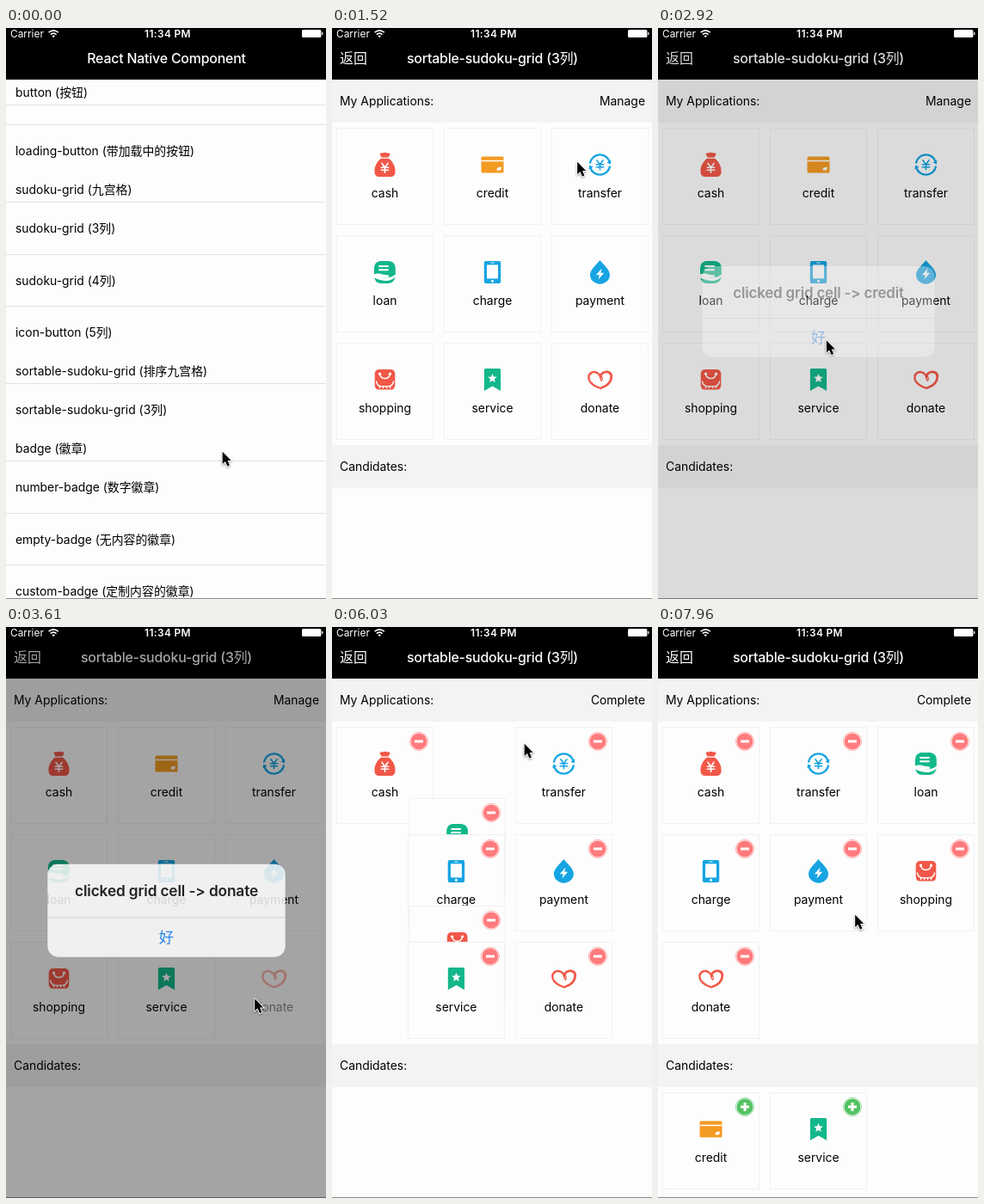
An HTML page that plays this animation: 372 by 664 pixels, repeating every 8000 ms.

```html
<!DOCTYPE html>
<html lang="zh-CN">
<head>
<meta charset="utf-8">
<title>Sortable grid</title>
<style>
  html, body { margin: 0; width: 100%; height: 100%; overflow: hidden; background: #fdfdfd; }
  svg { display: block; width: 100vw; height: 100vh; }
  text {
    font: 13.9px Inter, "Noto Sans CJK SC", "Noto Sans CJK", sans-serif;
    font-feature-settings: "calt" 0;
    white-space: pre;
  }
  .mid { text-anchor: middle; }
  .end { text-anchor: end; }
  .nav { fill: #fff; font-size: 15.9px; }
  .title { font-weight: 500; letter-spacing: -.2px; }
  .status { fill: #fff; font-size: 11.9px; }
  .clock { font-weight: 600; letter-spacing: .35px; }
  .ask { font-size: 16.9px; font-weight: 600; letter-spacing: -.15px; fill: #111; }
  .ok { font-size: 17px; font-weight: 500; fill: #1482f5; }
</style>
</head>
<body>
<svg id="stage" viewBox="0 0 372 664" preserveAspectRatio="none">
  <rect width="372" height="664" fill="#fdfdfd"/>
  <g id="list"></g>
  <g id="page">
    <rect y="60" width="372" height="604" fill="#fdfdfd"/>
    <path d="M0 60H372V110H0ZM0 485H372V535H0Z" fill="#f3f3f3"/>
    <text x="9" y="90">My Applications:</text>
    <text x="364" y="90" class="end" id="mode"></text>
    <text x="9" y="515">Candidates:</text>
    <g id="cells"></g>
  </g>
  <rect width="372" height="60"/>
  <text x="186.5" y="41" class="nav title mid" id="homeTitle">React Native Component</text>
  <text x="186.5" y="41" class="nav title mid" id="pageTitle">sortable-sudoku-grid (3列)</text>
  <text x="9" y="41" class="nav" id="back">返回</text>
  <path d="M0 663.5H372" stroke="#8c8c8c"/>
  <rect id="shade" width="372" height="664"/>
  <g id="alert">
    <rect x="-135" y="-52.7" width="270" height="105.4" rx="12" fill="#fff" fill-opacity=".95"/>
    <path d="M-135 8H135" stroke="#cfcfd2" stroke-width=".8"/>
    <text y="-16" class="ask mid" id="ask"></text>
    <text y="36.5" class="ok mid">好</text>
  </g>
  <text x="5" y="11" class="status">Carrier</text>
  <text x="188" y="11" class="status clock mid">11:34 PM</text>
  <g fill="none" stroke="#fff" stroke-width="1.6">
    <path d="M49.6 5.2Q55.2 .4 60.8 5.2M51.8 7.6Q55.2 4.6 58.6 7.6"/>
    <path d="M55.2 11.2L53.4 9.2Q55.2 7.8 57 9.2Z" fill="#fff" stroke="none"/>
    <rect x="344" y="2" width="22.4" height="9" rx="1.6" fill="#fff" stroke="none"/>
    <path d="M367.8 5V8" stroke-width="1.2"/>
  </g>
  <path id="cursor" d="M1.2 .8v14.2l3.3 -3l2.4 5.6l2.5 -1.1l-2.3 -5.5h4.1z"
        stroke="#fff" stroke-width="1.8" paint-order="stroke" stroke-linejoin="round"
        style="filter:drop-shadow(0 1px 1px #0006)"/>
</svg>
<script>
const LOOP = 8000;
const $ = id => document.getElementById(id);
const RED = '#f25848', ORANGE = '#f49b24', BLUE = '#16a4e2', GREEN = '#13b78b';

// List screen: [text centre, label, line below, is header]
const rows = [
  [82, 'image-button (图标按钮)', 112.5],
  [75, 'button (按钮)', 89.5, true],
  [143, 'loading-button (带加载中的按钮)'],
  [188, 'sudoku-grid (九宫格)', 202.5],
  [233, 'sudoku-grid (3列)', 263.5],
  [293.5, 'sudoku-grid (4列)', 323.5],
  [354, 'icon-button (5列)'],
  [399, 'sortable-sudoku-grid (排序九宫格)', 413.5],
  [444, 'sortable-sudoku-grid (3列)'],
  [489, 'badge (徽章)', 503.5],
  [534, 'number-badge (数字徽章)', 564.5],
  [594.5, 'empty-badge (无内容的徽章)', 624.5],
  [655, 'custom-badge (定制内容的徽章)']
];
$('list').innerHTML =
  '<rect id="press" y="414" width="372" height="60" fill="#dcdcdc"/>' +
  rows.map(([y, label, line, sticky]) =>
    (sticky ? '<rect y="60" width="372" height="29" fill="#fdfdfd"/>' : '') +
    `<text x="11" y="${y + 5}">${label}</text>` +
    (line ? `<path d="M0 ${line}H372" stroke="#e2e2e2"/>` : '')
  ).join('');

// Icons are drawn around their own centre
const shape = (d, fill) => `<path d="${d}" fill="${fill}"/>`;
const line = (d, color, width) =>
  `<path d="${d}" fill="none" stroke="${color}" stroke-width="${width}" stroke-linecap="round" stroke-linejoin="round"/>`;
const yen = (y, color) =>
  line(`M-3.6 ${y - 5}L0 ${y}L3.6 ${y - 5}M0 ${y}V${y + 6}M-4.2 ${y}H4.2M-4.2 ${y + 3}H4.2`, color, 1.6);
const star = Array.from({ length: 10 }, (_, i) => {
  const r = i % 2 ? 2.5 : 5.6, a = i * Math.PI / 5;
  return `${(r * Math.sin(a)).toFixed(2)} ${(-1.5 - r * Math.cos(a)).toFixed(2)}`;
}).join('L');

const icons = {
  cash: shape('M-6 -12.5Q-5 -14.5 -3 -13.5Q0 -14.8 3 -13.5Q6 -14.5 6 -12L4 -8.5H-4Z', RED) +
    shape('M-4.5 -7.3H4.5C9 -4 12.5 2 12 8C12 12 10 14 6 14H-6C-10 14 -12 12 -12 8C-12.5 2 -9 -4 -4.5 -7.3Z', RED) +
    yen(3.3, '#fff'),
  credit: `<rect x="-13" y="-9.5" width="26" height="19" rx="1.5" fill="${ORANGE}"/>` +
    shape('M-13 -5.2H13V-3.8H-13ZM5.5 3.5L10.5 2.5L9.5 6.5H5Z', '#fff'),
  transfer: line('M-11.4 -2.5A11.7 11.7 0 0 1 11.2 -3.4M11.4 2.5A11.7 11.7 0 0 1 -11.2 3.4', BLUE, 2.4) +
    shape('M13 -5.5L12.4 -.6L8 -2.6ZM-13 5.5L-12.4 .6L-8 2.6Z', BLUE) + yen(-.2, BLUE),
  loan: shape('M-6 -13H5Q12 -12 12.3 -5V5Q11 12 4 13H-5Q-12 12 -12.5 5V-5Q-12 -12 -6 -13Z', GREEN) +
    line('M-6.5 -7H3.5M-6.5 -2.8H3.5', '#fff', 2) +
    shape('M-13 2.5Q-7 .5 -3 2.5L4 3.5Q6 5 3 6H-2Q6 7.5 12.5 2.5L13 5Q7 10.5 0 10Q-7 9 -13 6.5Z', '#fff'),
  charge: `<rect x="-9.7" y="-13" width="19.4" height="26" rx="2" fill="${BLUE}"/>` +
    '<rect x="-6.5" y="-8.6" width="13" height="16" fill="#fff"/><circle cy="10.3" r="1.5" fill="#fff"/>' +
    line('M-1.8 -11H1.8', '#fff', .9),
  payment: shape('M0 -14C4 -9 11.5 -3 11.5 3A11.5 10.7 0 0 1 -11.5 3C-11.5 -3 -4 -9 0 -14Z', BLUE) +
    shape('M2.2 -4.5L-4.6 3.2H-.6L-2 8.5L4.8 .8H.8Z', '#fff'),
  shopping: `<rect x="-11.8" y="-12" width="23.6" height="23.6" rx="5" fill="${RED}"/>` +
    line('M-6 -6.5Q-5 -1.5 0 -1.5Q5 -1.5 6 -6.5', '#fff', 1.4) +
    '<circle cx="-6" cy="-6.8" r="1.6" fill="#fff"/><circle cx="6" cy="-6.8" r="1.6" fill="#fff"/>' +
    line('M-10 2Q-9 7 -5 7.6H5Q9 7 10 2M-6 7.6V9.5M-2 7.6V9.5M2 7.6V9.5M6 7.6V9.5', '#fff', 1.4),
  service: shape('M-9.6 -11.5Q-9.6 -13 -8 -13H8Q9.6 -13 9.6 -11.5V13L0 7.6L-9.6 13Z', GREEN) +
    shape(`M${star}Z`, '#fff'),
  donate: line('M2.5 9C9 7 13.3 2 13.3 -3.5C13.3 -8 9.5 -9.8 6 -9C3 -8.3 .8 -6 .5 -3', RED, 2.8) +
    line('M.3 -4.5C-2 -8.3 -6 -9.8 -9 -8.6C-14 -6.5 -14.3 -1 -11 3C-8 6.5 -3.5 8.8 1 9.8', RED, 2.4) +
    line('M.5 -3C.2 -1 1 .5 2 1.4C3.2 -.5 3 -2.5 1.8 -4', RED, 1.2)
};

const names = Object.keys(icons);
$('cells').innerHTML = names.map(name => `
  <g>
    <rect x=".5" y=".5" width="112" height="112" fill="#fdfdfd" stroke="#f1f1f1"/>
    <g transform="translate(56.5 43)">${icons[name]}</g>
    <text x="56.5" y="81" class="mid">${name}</text>
    <g class="badge">
      <circle r="10.6" fill="#fff" stroke-width=".8" stroke-opacity=".75"/>
      <circle r="9.5" stroke="none"/>
      <path d="M-5 0H5" stroke="#fff" stroke-width="3"/>
      <path d="M0 -5V5" stroke="#fff" stroke-width="3" class="plus"/>
    </g>
  </g>`).join('');
const cells = [...$('cells').children].map((el, i) => ({
  el, name: names[i],
  badge: el.querySelector('.badge'),
  rings: el.querySelectorAll('.badge circle'),
  plus: el.querySelector('.plus')
}));

// Timeline
const removals = [
  { name: 'credit', gone: 5905, from: 5922, to: 6202 },
  { name: 'service', gone: 6850, from: 6870, to: 7150 }
];
const alerts = [
  { name: 'credit', press: 2110, open: 2150, close: 2830 },
  { name: 'donate', press: 3400, open: 3458, close: 4130 }
];
const path = [
  [0, 250.5, 492], [360, 250.5, 492], [530, 193, 463], [1150, 193, 463], [1510, 284, 155],
  [1640, 284, 155], [1930, 200, 178.5], [2350, 200, 178.5], [2700, 194, 362], [2900, 194, 362],
  [3330, 288, 431.5], [3640, 288, 431.5], [3980, 196, 362], [4110, 196, 362], [4310, 333, 145],
  [4480, 342, 88], [4950, 342, 88], [5390, 217, 159], [5450, 217, 159], [5620, 222.5, 135],
  [6150, 222.5, 135], [6530, 97, 384], [7250, 97, 384], [7570, 184, 562], [7620, 184, 562],
  [7790, 242, 440], [7960, 228, 334], [8000, 228, 334]
];

const span = (t, a, b) => Math.min(1, Math.max(0, (t - a) / (b - a)));
const smooth = p => p * p * (3 - 2 * p);
const easeOut = p => 1 - (1 - p) ** 3;
const set = (el, attrs) => { for (const k in attrs) el.setAttribute(k, attrs[k]); };
const slot = i => [5 + 125 * (i % 3), 116 + 125 * Math.floor(i / 3)];

// Slot of every cell before and after each removal
const stages = [names];
for (const r of removals) stages.push(stages.at(-1).filter(n => n !== r.name));

function placeCell(cell, t) {
  const order = removals.findIndex(r => r.name === cell.name);
  const removal = removals[order];
  const moved = removal && t >= removal.gone;
  let [x, y] = slot(names.indexOf(cell.name)), grow = 1;
  if (moved) {
    [x, y] = [5 + 125 * order, 541];
    grow = easeOut(span(t, removal.to, removal.to + 220));
  } else {
    removals.forEach((r, k) => {
      const a = stages[k].indexOf(cell.name), b = stages[k + 1].indexOf(cell.name);
      if (b < 0) return;
      const p = smooth(span(t, r.from, r.to)), [ax, ay] = slot(a), [bx, by] = slot(b);
      x += (bx - ax) * p;
      y += (by - ay) * p;
    });
  }
  const c = 56.5 * (1 - grow);
  const pressed = alerts.find(a => a.name === cell.name);
  const fade = pressed ? span(t, pressed.press, pressed.press + 40) - span(t, pressed.open + 260, pressed.open + 400) : 0;
  set(cell.el, {
    transform: `translate(${x + c} ${y + c}) scale(${grow})`,
    opacity: 1 - .55 * fade,
    visibility: grow > 0 ? 'visible' : 'hidden'
  });
  const color = moved ? '#53c262' : '#ff7b7d';
  set(cell.badge, { transform: `translate(96 17) scale(${easeOut(span(t, 4680, 4950))})` });
  set(cell.rings[0], { stroke: color });
  set(cell.rings[1], { fill: color });
  set(cell.plus, { opacity: moved ? 1 : 0 });
}

function drawAlert(t) {
  const a = t < 3300 ? alerts[0] : alerts[1];
  const show = easeOut(span(t, a.open, a.open + 300));
  const hide = easeOut(span(t, a.close, a.close + 300));
  const p = show * (1 - hide);
  set($('shade'), { opacity: .4 * p });
  set($('alert'), { opacity: p, transform: `translate(186.5 329.7) scale(${1.2 - .2 * show})` });
  $('ask').textContent = `clicked grid cell -> ${a.name}`;
}

function drawCursor(t) {
  const i = Math.max(1, path.findIndex(k => k[0] > t));
  const [t0, x0, y0] = path[i - 1], [t1, x1, y1] = path[i];
  const p = smooth(span(t, t0, t1));
  set($('cursor'), { transform: `translate(${x0 + (x1 - x0) * p} ${y0 + (y1 - y0) * p})` });
}

function draw(t) {
  const push = easeOut(span(t, 910, 1420));
  set($('press'), { opacity: t >= 830 && t < 1000 ? 1 : 0 });
  set($('list'), { transform: `translate(${-112 * push} 0)`, opacity: push < 1 ? 1 - .7 * push : 0 });
  set($('page'), { transform: `translate(${372 * (1 - push)} 0)` });
  set($('homeTitle'), { transform: `translate(${-90 * push} 0)`, opacity: 1 - push });
  set($('pageTitle'), { transform: `translate(${90 * (1 - push)} 0)`, opacity: push });
  set($('back'), { opacity: push });
  $('mode').textContent = t < 4640 ? 'Manage' : 'Complete';
  cells.forEach(cell => placeCell(cell, t));
  drawAlert(t);
  drawCursor(t);
}

const start = performance.now();
function tick() {
  draw((performance.now() - start) % LOOP);
  requestAnimationFrame(tick);
}
tick();
</script>
</body>
</html>
```
